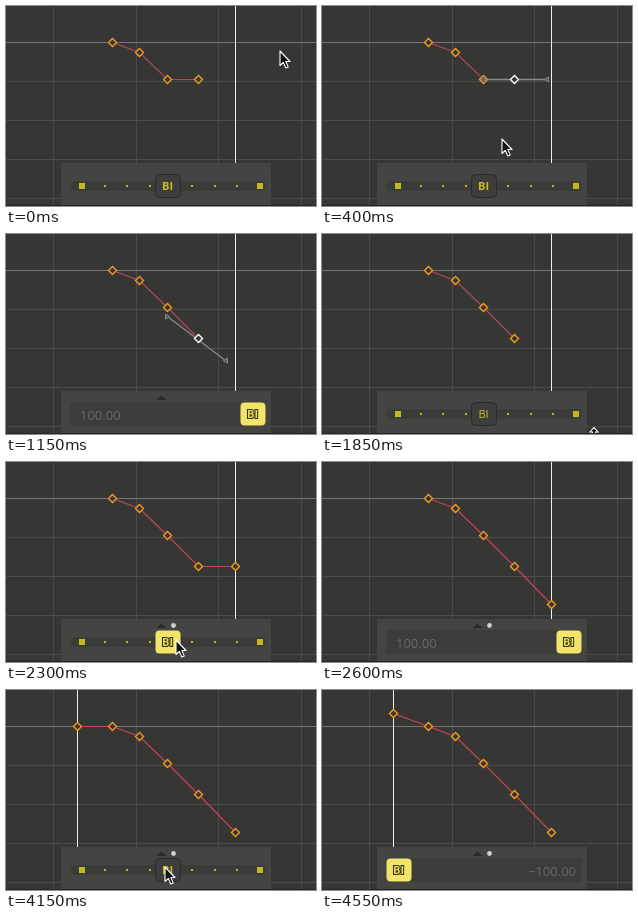
Recreate the animation shown at these times as an HTML page. Size 310 by 200 pixels, loop 4.8 s.

```html
<!DOCTYPE html>
<html lang="en">
<head>
<meta charset="utf-8">
<title>Curve blend slider</title>
<style>
  html, body { margin: 0; width: 100%; height: 100%; overflow: hidden; background: #383836; }
  svg { display: block; width: 100vw; height: 100vh; }
  text { font-family: "Open Sans", "Noto Sans", sans-serif; }
</style>
</head>
<body>
<svg id="stage" viewBox="0 0 310 200"></svg>
<script>
const LOOP = 4800, STEP = 50;
const YELLOW = '#c3b71f', ORANGE = '#f49a20', BG = '#363634';
const stage = document.getElementById('stage');

function add(parent, tag, attrs = {}, text = '') {
  const el = document.createElementNS('http://www.w3.org/2000/svg', tag);
  set(el, attrs);
  el.textContent = text;
  return parent.appendChild(el);
}
function set(el, attrs) {
  for (const name in attrs) el.setAttribute(name, attrs[name]);
}
const rect = (parent, x, y, width, height, fill, rx = 0) =>
  add(parent, 'rect', { x, y, width, height, fill, rx });
const group = (parent = stage) => add(parent, 'g');
const show = (el, on) => el.setAttribute('display', on ? 'inline' : 'none');
const place = (el, x, y) => el.setAttribute('transform', `translate(${x} ${y})`);
const within = (t, ...spans) => spans.some(([from, to]) => t >= from && t < to);

// Linear interpolation through rows of [time, value, value...]
function follow(rows, t) {
  const last = rows[rows.length - 1];
  if (t >= last[0]) return last.slice(1);
  const i = Math.max(1, rows.findIndex(row => row[0] > t));
  const [a, b] = [rows[i - 1], rows[i]];
  const k = Math.max(0, (t - a[0]) / (b[0] - a[0]));
  return a.slice(1).map((v, n) => v + (b[n + 1] - v) * k);
}

const PLAYHEAD = [
  [3100, 229], [3150, 212], [3200, 186], [3250, 155], [3300, 127], [3350, 105],
  [3450, 90], [3550, 81], [3650, 75], [3700, 71]
];
const BLEND = [
  [900, 0], [1150, 1], [1349, 1], [1350, 0],
  [2400, 0], [2600, 1], [2749, 1], [2750, 0],
  [4300, 0], [4550, -1]
];
const POINTER = [
  [0, 274, 45], [250, 193, 74], [300, 191, 80], [450, 175, 160],
  [650, 174, 160], [850, 163, 177], [1300, 163, 177],
  [1350, 247, 178], [1550, 298, 128], [1650, 299, 130], [1850, 272, 198],
  [2150, 162, 178], [3800, 250, 174], [3850, 248, 174], [4100, 159, 177]
];

// Graph
rect(stage, 0, 0, 310, 200, BG);
for (const x of [47, 130, 212, 295]) rect(stage, x, 0, 1, 200, '#4b4b49');
for (const y of [75, 114, 153, 192]) rect(stage, 0, y, 310, 1, '#4b4b49');
rect(stage, 0, 36, 310, 1, '#757573');
const playhead = rect(stage, 0, 0, 1, 158, '#f0f0f0');

const graph = group();
place(graph, .5, .5);
const curve = add(graph, 'polyline', { fill: 'none', 'stroke-width': 1.1 });
const keys = Array.from({ length: 6 }, () => add(graph, 'path', {
  d: 'M0-4L4 0L0 4L-4 0Z', fill: BG, 'stroke-width': 1.4
}));
const handles = group(graph);
const handleLine = add(handles, 'path', { stroke: '#8a8a88', 'stroke-width': 1.3 });
const handleEnds = [1, -1].map(side => add(handles, 'path', {
  d: `M${-2 * side}-2.5L${2 * side} 0L${-2 * side} 2.5Z`,
  fill: '#555', stroke: '#8a8a88'
}));
graph.append(keys[4]);

const pointer = group();
const arrow = add(pointer, 'path', {
  d: 'M0 0V14.5L3.3 11.4L5.8 17L8.2 15.9L5.8 10.5H10Z',
  fill: '#111', stroke: '#fff', 'stroke-width': 1.1, 'stroke-linejoin': 'round'
});
const mover = add(pointer, 'path', {
  d: 'M0-4.5L4 0H1.5V4H-1.5V0H-4Z',
  fill: '#111', stroke: '#fff', 'stroke-width': 1.1
});

// Slider panel
const panel = group();
rect(panel, 55, 157, 210, 42, '#444443');
rect(stage, 0, 199, 310, 1, '#282526');

const ticks = group(panel);
rect(ticks, 65, 175, 195, 10, '#3b3b3a', 4);
for (const x of [73, 251]) rect(ticks, x, 177, 6, 6, YELLOW);
for (const x of [98, 120, 143, 185, 208, 230]) rect(ticks, x, 179, 2, 2, YELLOW);

const field = group(panel);
rect(field, 64, 168, 196, 24, '#3c3c3b', 4);
const amount = add(field, 'text', { y: 186, 'font-size': 13, fill: '#686867' });

const hover = group(panel);
add(hover, 'path', { d: 'M150.5 166L155.5 161.5L160.5 166Z', fill: '#292928' });
const dot = add(hover, 'circle', { cx: 167.5, cy: 163.5, r: 2.4, fill: '#d0d0cf' });

const knob = group(panel);
const face = rect(knob, -12.5, -11.5, 25, 23, '#3d3d3c', 4);
const label = add(knob, 'text', {
  x: -.5, y: 4, 'font-size': 11, 'text-anchor': 'middle', 'paint-order': 'stroke'
}, 'BI');

function render(t) {
  const [blend] = follow(BLEND, t);
  const [x, y] = follow(POINTER, t);
  const editing = within(t, [950, 1350], [2450, 2750], [4350, LOOP]);
  const pressed = editing || within(t, [850, 950], [2300, 2450], [4250, 4350]);
  const selected = within(t, [250, 1600]);

  playhead.setAttribute('x', Math.round(follow(PLAYHEAD, t)[0]));

  const dropped = t < 1350 ? Math.max(0, blend) : 1;
  const midY = 73 + 31 * dropped;
  const endY = t < 2750 ? 104 + 38 * blend : 142;
  const points = [
    t >= 4100 && [71, 36 + 13 * Math.min(0, blend)],
    [106, 36], [133, 46], [161, 73], [192, midY],
    t >= 2250 && [229, endY]
  ];
  set(curve, {
    points: points.filter(Boolean).join(' '),
    stroke: t < 2250 ? '#b5475a' : '#c94552'
  });
  keys.forEach((key, i) => {
    show(key, points[i]);
    if (points[i]) place(key, ...points[i]);
    key.setAttribute('stroke', selected && i === 4 ? '#fff' : ORANGE);
  });

  show(handles, selected);
  const tilt = 22 * dropped;
  const reach = 32 - 5 * dropped;
  const left = [161, midY - tilt], right = [192 + reach, midY + tilt];
  handleLine.setAttribute('d', `M${left}L${right}`);
  place(handleEnds[0], ...left);
  place(handleEnds[1], ...right);

  show(ticks, !editing);
  show(field, editing);
  amount.textContent = (100 * blend).toFixed(2).replace('-', '−');
  set(amount, blend < 0
    ? { x: 254, 'text-anchor': 'end' }
    : { x: 74, 'text-anchor': 'start' });

  show(hover, within(t, [700, 1450], [2100, 2800], [4050, LOOP]));
  show(dot, t >= 2100);
  place(knob, 162 + 85 * blend, 180);
  set(face, pressed
    ? { fill: '#f2e468', stroke: '#f2e468', 'stroke-width': 0 }
    : { fill: '#3d3d3c', stroke: '#2a2a29', 'stroke-width': 1 });
  set(label, {
    fill: pressed ? '#e9da4a' : '#cabd22',
    stroke: pressed ? '#2f2e20' : 'none',
    'stroke-width': pressed ? 2 : 0,
    'font-weight': pressed || t < 650 || t >= 4050 ? 700 : 400
  });

  const inPanel = t >= 650;
  if (inPanel !== (pointer.previousSibling === panel)) {
    inPanel ? panel.after(pointer) : panel.before(pointer);
  }
  show(pointer, within(t, [0, 450], [650, 950], [1350, 2400], [3850, 4350]));
  const moving = within(t, [1800, 1950]);
  show(mover, moving);
  show(arrow, !moving);
  place(pointer, Math.round(x), Math.round(y));
}

const start = performance.now();
function tick() {
  const t = (performance.now() - start) % LOOP;
  render(Math.floor(t / STEP) * STEP);
  requestAnimationFrame(tick);
}
tick();
</script>
</body>
</html>
```
